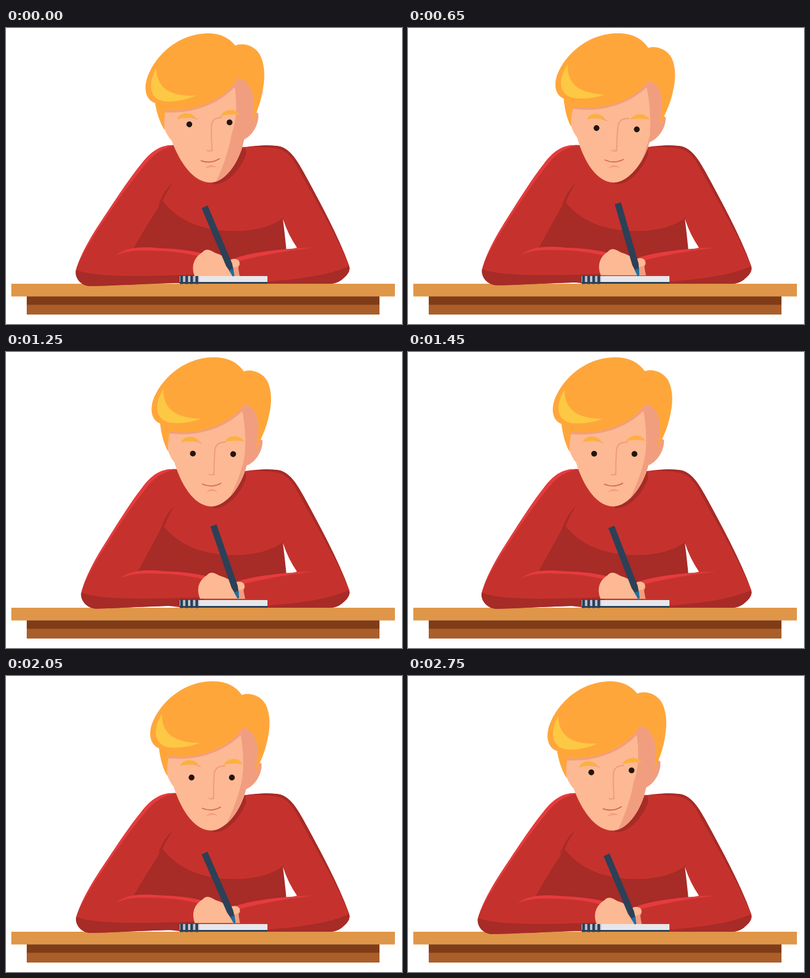
These frames come from a looping animation (668x500 px, 2.8 s). An HTML page with a canvas:

```html
<!DOCTYPE html>
<html lang="en">
<head>
<meta charset="utf-8">
<title>Writing at a desk</title>
<style>
  html, body { margin: 0; width: 100%; height: 100%; overflow: hidden; background: #fff; }
  canvas { display: block; }
</style>
</head>
<body>
<canvas id="stage" width="668" height="500"></canvas>
<script>
const ctx = document.getElementById('stage').getContext('2d');
const LOOP = 2800, STEP = 50;

const C = {
  red: '#c5322d', darkRed: '#a72b27', lightRed: '#e63b3d',
  skin: '#fcb994', skinShade: '#f19e80', line: '#ee9c7d', mouth: '#d9674f',
  hair: '#ffa63b', hairLight: '#fdc843', brow: '#fdb040', eye: '#24140f',
  ink: '#2c4058', nib: '#1d6f9f', page: '#e7e7ea',
  desk: '#df9648', deskDark: '#803c17', deskSide: '#aa5e2a'
};

// Pose over time; each list is aligned with KEYS and wraps around.
const KEYS = [0, 650, 1250, 1700, 2050, 2450, 2750];
const POSE = {
  tilt:  [-.049, .033, .014, 0, 0, -.026, -.049],
  eyeX:  [1, 2, 1, 0, 0, .5, 1],
  eyeY:  [-11, -2, 0, 0, -.5, -6, -11],
  browX: [0, 4, 0, 0, 0, 0, 0],
  browY: [0, 4, 1.5, 0, 0, 0, 0],
  slide: [0, 7, 9, 2, .5, 0, 0],
  lift:  [0, -1.3, -2.3, -2, -1.8, -.3, 0],
  topX:  [335, 354, 350, 335, 335, 343, 335],
  topY:  [302, 296, 293, 299, 299, 300, 302],
  tipX:  [384, 389, 392, 386, 386, 382, 384],
  tipY:  [418, 418, 415, 416, 416, 418, 418]
};

// Monotone cubic interpolation: smooth, flat at the extremes.
function sample(values, t) {
  const n = KEYS.length;
  const timeAt = i => KEYS[(i + n) % n] + LOOP * Math.floor(i / n);
  const at = i => values[(i + n) % n];
  const slope = i => (at(i + 1) - at(i)) / (timeAt(i + 1) - timeAt(i));
  const tangent = i => {
    const a = slope(i - 1), b = slope(i);
    return a * b <= 0 ? 0 : 2 * a * b / (a + b);
  };
  let i = n - 1;
  while (KEYS[i] > t) i--;
  const span = timeAt(i + 1) - timeAt(i);
  const u = (t - KEYS[i]) / span, v = 1 - u;
  return at(i) * v * v * (1 + 2 * u) + at(i + 1) * u * u * (3 - 2 * u)
    + span * u * v * (tangent(i) * v - tangent(i + 1) * u);
}

function fill(d, color) {
  ctx.fillStyle = color;
  ctx.fill(new Path2D(d));
}

function stroke(d, color, width) {
  ctx.strokeStyle = color;
  ctx.lineWidth = width;
  ctx.lineCap = 'round';
  ctx.stroke(new Path2D(d));
}

function rect(x, y, w, h, color) {
  ctx.fillStyle = color;
  ctx.fillRect(x, y, w, h);
}

function dot(x, y, r, color) {
  ctx.fillStyle = color;
  ctx.beginPath();
  ctx.arc(x, y, r, 0, Math.PI * 2);
  ctx.fill();
}

function drawDesk() {
  rect(9, 432, 647, 21.5, C.desk);
  rect(35, 453.5, 595, 30.5, C.deskSide);
  rect(35, 453.5, 595, 14, C.deskDark);
}

function drawTorso() {
  fill('M270 199 L404 201 C430 197 450 198 462 200 C478 204 490 222 500 240 C530 295 560 350 579 402 Q582 412 570 422 C560 432 550 432 545 432 L300 432 L200 420 L215 372 L262 260 Z', C.red);
  fill('M264 292 C290 325 330 343 385 343 C420 343 450 335 468 320 L474 376 C450 378 420 382 390 388 L330 400 L212 374 Z', C.darkRed);
  fill('M467 322 Q470 345 473 376 L491 371 Q476 350 467 322', '#fff');
  fill('M467 322 Q478 350 491 371 L518 370 C500 358 480 338 467 322', C.red);
  fill('M388 388 C420 378 470 372 520 371 C480 375 430 384 392 394 Z', C.lightRed);
  fill('M441 428 C490 425 545 418 579 402 Q582 412 570 422 C560 432 550 432 545 432 L441 432 Z', C.darkRed);
  fill('M415 201 C430 197 450 198 462 200 C478 204 490 222 500 240 C530 295 560 350 579 402 C560 355 530 305 494 240 C484 220 474 207 458 204 C445 201 430 201 415 201', C.darkRed);
  fill('M404 202 L405 213 C398 235 375 265 350 264 L335 245 Z', C.darkRed);
}

// The writing arm leans from the shoulder, so the forearm slides along the desk.
function withArm(p, draw) {
  const lean = p.slide / 210, rise = p.lift / 220;
  ctx.save();
  ctx.transform(1, 0, lean, 1 + rise, -200 * lean, -200 * rise);
  draw();
  ctx.restore();
}

function drawArm() {
  fill('M290 198 C262 196 245 208 228 230 C205 258 175 305 155 335 C140 358 127 382 119 405 C115 420 124 434 140 436 C170 436 250 431 325 430 L330 380 C290 375 240 370 214 374 L258 298 C268 282 275 270 281 262 L300 225 Z', C.red);
  fill('M281 262 C272 268 262 285 256 302 L264 293 Q270 278 281 262', C.darkRed);
  fill('M286 198 C262 196 245 208 228 230 C205 258 175 305 155 335 C142 355 130 377 122 397 C135 372 148 350 161 332 C182 300 210 260 233 233 C248 214 262 203 286 198', C.lightRed);
  fill('M118 408 C140 420 220 421 325 416 L325 430 C250 431 170 436 140 436 C124 434 115 420 118 408', C.darkRed);
  fill('M185 384 C205 370 225 369 260 372 C290 373 312 376 328 380 L326 386 C300 379 270 376 240 376 C215 375 200 378 185 384', C.lightRed);
}

function drawHead(p) {
  const face = new Path2D('M262 110 L267 138 C268 158 273 176 283 187 C289 207 310 261 347 261 C372 260 397 226 405 191 C418 186 432 168 431 148 L424 145 L428 85 L340 70 Z');
  const high = p.tilt * 100, low = p.tilt * 250;
  ctx.save();
  ctx.translate(347, 260);
  ctx.rotate(p.tilt);
  ctx.translate(-347, -260);

  ctx.fillStyle = C.skin;
  ctx.fill(face);
  ctx.save();
  ctx.clip(face);
  fill(`M392 80 C${400 + high} 115 ${403 + high} 150 ${397 + low} 180 C${391 + low} 208 ${378 + low} 240 ${364 + low} 264 L440 264 L440 80 Z`, C.skinShade);
  stroke('M264 135 C315 143 365 130 400 92', C.skinShade, 5);
  ctx.restore();

  fill('M258 122 C260 138 264 155 272 169 Q271 150 275 135 C315 141 372 128 400 87 C416 91 424 107 424 125 Q424 145 420 163 C428 148 438 127 442 103 C446 85 446 64 438 48 C430 33 410 27 398 32 C386 15 368 8 345 9 C305 10 269 36 251 70 C238 94 242 116 258 122 Z', C.hair);
  fill('M263 64 C247 88 247 121 283 121 C299 121 315 118 327 113 C290 113 262 101 263 64', C.hairLight);

  stroke('M369 152 C357 152 351 157 351 168 L350 190 Q351 204 349 207', C.line, 2);
  stroke('M342 206.5 Q347 209 351 206.5', C.line, 1.8);
  stroke('M331 223.5 Q347 230 362 221.5', C.mouth, 1.8);
  fill('M337 237 Q346 227 357 236 Q347 233 337 237', C.skinShade);

  ctx.save();
  ctx.translate(p.browX, p.browY);
  stroke('M305 149 Q318 148 328 153', C.skinShade, 1.5);
  fill('M294 152 Q297 143 308 142 Q320 142 325 150 Q308 148 294 152', C.brow);
  fill('M367 150 Q372 141 384 140 Q394 140 400 149 Q384 146 367 150', C.brow);
  ctx.restore();

  for (const x of [313, 381]) dot(x + p.eyeX, 172 + p.eyeY, 4.9, C.eye);
  ctx.restore();
}

function drawNotebook() {
  rect(293, 419, 148, 13, C.page);
  rect(293, 419, 33, 11, '#bfc3cc');
  rect(293, 429, 148, 3, C.ink);
  for (let i = 0; i < 4; i++) rect(294 + i * 8.5, 418, 4.5, 14.5, C.ink);
}

function drawHand() {
  fill('M318 419 C312 402 317 388 331 379 C338 371 345 375 353 380 C363 383 371 388 378 392 C384 388 394 390 394 397 Q395 402 390 404 L394 419 Z', C.skin);
  fill('M384 404 Q391 405 393 399 L392 406 L394 419 L380 419 Z', C.skinShade);
}

function drawPen(p) {
  const dx = p.tipX - p.topX, dy = p.tipY - p.topY;
  const length = Math.hypot(dx, dy);
  ctx.save();
  ctx.translate(p.topX, p.topY);
  ctx.rotate(Math.atan2(dy, dx));
  fill(`M0 -5.5 L${length - 20} -5.5 L${length - 9} -3.5 L${length} 0 L${length - 10} 3.5 L${length - 20} 5.5 L0 5.5 Z`, C.ink);
  fill(`M${length - 11} -4 L${length + 1} -1 L${length + 1} 2 L${length - 11} 4 Z`, C.nib);
  ctx.restore();
}

function render(t) {
  const p = {};
  for (const name in POSE) p[name] = sample(POSE[name], t);
  rect(0, 0, 668, 500, '#fff');
  drawDesk();
  drawTorso();
  withArm(p, drawArm);
  drawHead(p);
  drawNotebook();
  withArm(p, drawHand);
  drawPen(p);
}

const start = performance.now();
function tick() {
  const t = (performance.now() - start) % LOOP;
  render(Math.floor(t / STEP) * STEP);
  requestAnimationFrame(tick);
}
tick();
</script>
</body>
</html>
```
